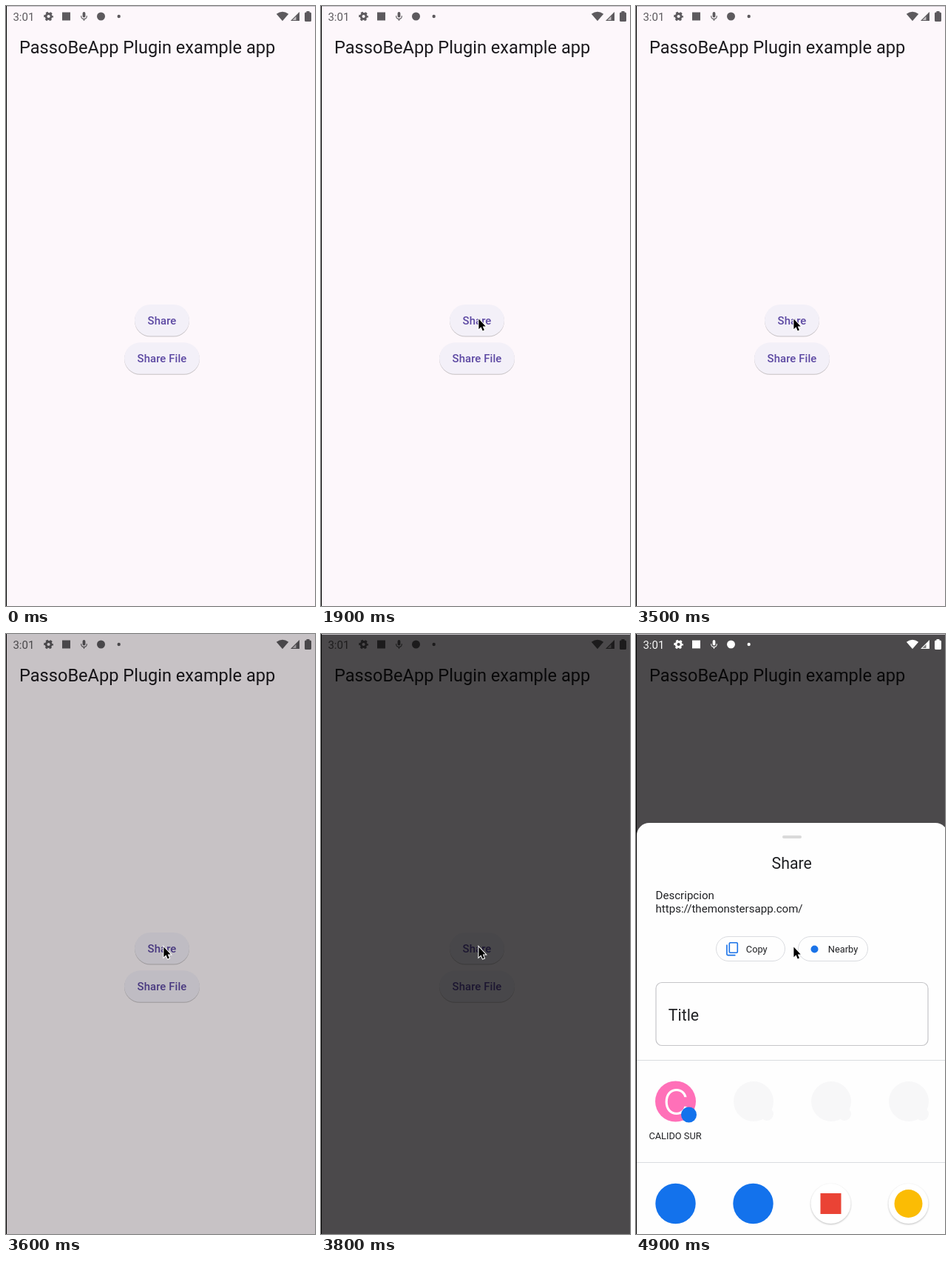
Recreate the animation shown at these times as an HTML page. Size 418 by 810 pixels, loop 5 s.

```html
<!DOCTYPE html>
<html lang="en">
<head>
<meta charset="utf-8">
<title>Share sheet demo</title>
<style>
  html, body { margin: 0; width: 100%; height: 100%; overflow: hidden; background: #fdf7fb; }
  svg { display: block; width: 418px; height: 810px; font-family: Roboto, sans-serif; }
  .button rect { fill: #f3f0f8; filter: drop-shadow(0 1px .7px rgba(0, 0, 0, .22)); }
  .button text { fill: #5d49a3; font-size: 14.9px; font-weight: 500; letter-spacing: .1px; text-anchor: middle; }
  .body { font-size: 15.1px; }
  .small { font-size: 12.8px; }
  .large { font-size: 21.3px; }
  .mid { text-anchor: middle; }
  .outline { fill: none; stroke: #dadce0; }
  .tile { fill: #fff; filter: drop-shadow(0 1px 1px rgba(0, 0, 0, .25)); }
</style>
</head>
<body>
<svg viewBox="0 0 418 810">
  <defs>
    <g id="status" fill="currentColor">
      <text x="9.4" y="19.5" font-size="15">3:01</text>
      <g fill="none" stroke="currentColor">
        <circle cx="57.6" cy="14" r="3.5" stroke-width="2.8"/>
        <circle cx="57.6" cy="14" r="5.2" stroke-width="2.4" stroke-dasharray="2.9 2.545" stroke-dashoffset="1.45"/>
        <path d="M101.7 13.2v.6a3.8 3.8 0 0 0 7.6 0v-.6M105.5 17.6v2.4" stroke-width="1.2"/>
      </g>
      <rect x="76" y="8.5" width="11" height="11"/>
      <rect x="103.6" y="8" width="3.8" height="7.6" rx="1.9"/>
      <circle cx="128.5" cy="14" r="5.5"/>
      <circle cx="152.7" cy="14" r="2.2"/>
      <path d="M365.8 10.8Q374 4.6 382.2 10.8L374 20.3Z"/>
      <path d="M397 8V20H385Z" opacity=".35"/>
      <path d="M397 8V20H385ZM392.5 13.9L387.5 18.9H392.5Z" fill-rule="evenodd"/>
      <path d="M406.5 8.4V7H410.5V8.4H411.5Q413 8.4 413 9.9V19.5Q413 21 411.5 21H405.5Q404 21 404 19.5V9.9Q404 8.4 405.5 8.4Z"/>
    </g>
    <g id="waiting" fill="#f7f7f8">
      <circle r="27"/>
      <circle cx="18" cy="17" r="9"/>
    </g>
  </defs>

  <rect width="418" height="810" fill="#fdf7fb"/>
  <use href="#status" color="#5d5a5e"/>
  <text x="18" y="64.2" font-size="23.6" fill="#1c1a1e">PassoBeApp Plugin example app</text>
  <g class="button">
    <rect x="174" y="403" width="74" height="42.5" rx="21.25"/>
    <text x="211" y="429.6">Share</text>
    <rect x="160" y="454.3" width="102" height="42.5" rx="21.25"/>
    <text x="211" y="481">Share File</text>
  </g>

  <rect id="dim" width="418" height="810" opacity="0"/>
  <use id="bright" href="#status" color="#fff" visibility="hidden"/>

  <g id="sheet" fill="#202124" visibility="hidden">
    <rect x="1" y="255" width="421" height="580" rx="17" fill="#fefefe"/>
    <rect x="198" y="272" width="26" height="4" rx="2" fill="#dadada"/>
    <text class="large mid" x="210.7" y="316.5">Share</text>
    <text class="body" x="26.5" y="358">Descripcion</text>
    <text class="body" x="26.5" y="376">https://themonstersapp.com/</text>

    <rect class="outline" x="108.5" y="408.5" width="93" height="33" rx="16.5"/>
    <g fill="none" stroke="#1a73e8" stroke-width="1.6">
      <rect x="126.3" y="416.8" width="11" height="13.5" rx="1.2"/>
      <path d="M122.9 419.5V432.3Q122.9 433.6 124.2 433.6H134.5"/>
    </g>
    <text class="small" x="148.8" y="430">Copy</text>
    <rect class="outline" x="219.5" y="408.5" width="94" height="33" rx="16.5"/>
    <circle cx="241.5" cy="425.5" r="5" fill="#1a73e8"/>
    <text class="small" x="259.8" y="430">Nearby</text>

    <rect x="27" y="470.5" width="368" height="85" rx="8" fill="none" stroke="#c5c5c8" stroke-width="1.2"/>
    <text class="large" x="43.8" y="521.7">Title</text>
    <path class="outline" d="M1 575.5H418M1 713.5H418"/>

    <circle cx="53.5" cy="631" r="27.5" fill="#ff70b8"/>
    <text class="mid" x="54" y="648.5" font-size="48" font-weight="300" font-family="Inter, sans-serif" fill="#fff">C</text>
    <circle cx="71.5" cy="649" r="10.5" fill="#1372ec"/>
    <text class="small mid" x="53" y="682">CALIDO SUR</text>
    <use href="#waiting" x="159" y="631"/>
    <use href="#waiting" x="264" y="631"/>
    <use href="#waiting" x="369" y="631"/>

    <circle cx="53.5" cy="769" r="27.2" fill="#1372ec"/>
    <circle cx="158.5" cy="769" r="27.2" fill="#1372ec"/>
    <circle class="tile" cx="263.5" cy="769" r="27"/>
    <rect x="249.5" y="755" width="28" height="28" fill="#ea4335"/>
    <circle class="tile" cx="368.5" cy="769" r="27"/>
    <circle cx="368.5" cy="769" r="19" fill="#fbbc04"/>
  </g>

  <path d="M0 .5H418" stroke="#c6c3c8"/>
  <path d="M.5 0V810" stroke="#000"/>
  <path id="cursor" d="M0 0V13.6L3.1 10.7L5.3 15.9L7.5 15L5.3 9.9H9.3Z"
        stroke="#fff" stroke-width="2" paint-order="stroke" visibility="hidden"/>
</svg>
<script>
  const LOOP = 5000, STEP = 100;
  // [time, x, y] of the pointer tip
  const pointer = [[700, 275, 461], [800, 231, 434], [900, 185, 419], [1000, 217, 424], [1900, 213.4, 422.6]];
  const [dim, bright, sheet, cursor] =
    ['dim', 'bright', 'sheet', 'cursor'].map(id => document.getElementById(id));

  const clamp = v => Math.min(1, Math.max(0, v));
  const show = (el, on) => el.setAttribute('visibility', on ? 'visible' : 'hidden');
  const move = (el, x, y) => el.setAttribute('transform', `translate(${x} ${y})`);

  function render(time) {
    const t = Math.floor(time % LOOP / STEP) * STEP;

    const at = pointer.filter(p => p[0] <= t).pop();
    show(cursor, at);
    if (at) move(cursor, at[1], at[2]);

    dim.setAttribute('opacity', 0.7 * clamp((t - 3510) / 290));

    // the sheet rises with a cubic ease-out
    const left = 1 - clamp((t - 3850) / 350);
    move(sheet, 0, Math.round(640 * left ** 3));
    show(sheet, t >= 3900);
    show(bright, t >= 3900);
  }

  const start = performance.now();
  function tick() {
    render(performance.now() - start);
    requestAnimationFrame(tick);
  }
  tick();
</script>
</body>
</html>
```
